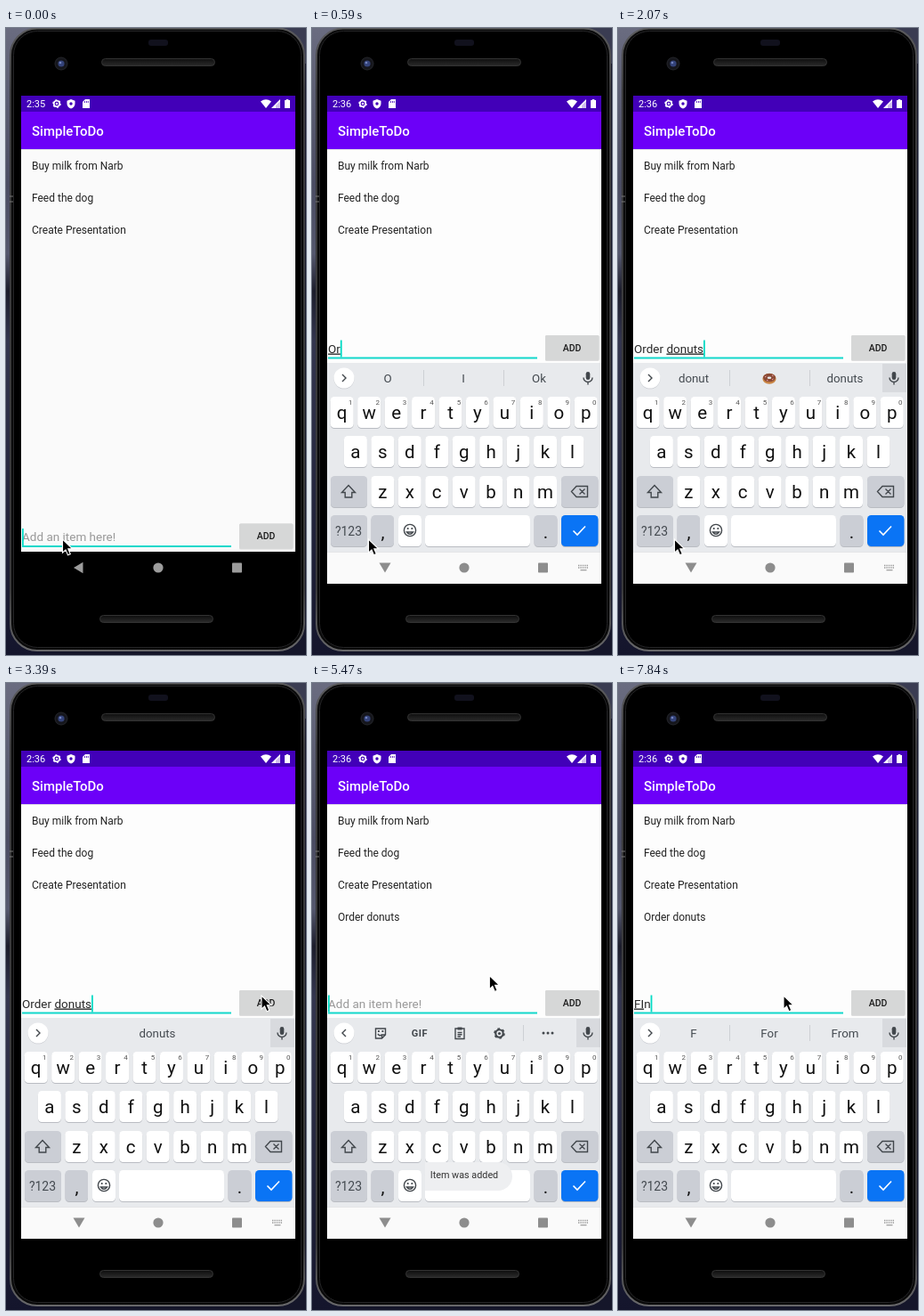
These frames come from a looping animation (337 by 704 pixels, 7990 ms). An HTML page:

```html
<!DOCTYPE html>
<html lang="en">
<head>
<meta charset="utf-8">
<title>To-do app</title>
<style>
  html, body { margin: 0; width: 100%; height: 100%; overflow: hidden; background: #15162a; }
  svg { display: block; width: 100vw; height: 100vh; font-family: Roboto, "Noto Sans", sans-serif; }
  text { white-space: pre; }
  .mid { text-anchor: middle; }
  .item { font-size: 12px; fill: #222; }
  .field { font-size: 13.5px; fill: #2a2a2a; }
  .hint { fill: #999; }
  .word { text-decoration: underline; }
  .letter { font-size: 20.5px; fill: #111; text-anchor: middle; }
  .digit { font-size: 8px; fill: #555; text-anchor: middle; }
  .sug { font-size: 13.3px; fill: #444a50; text-anchor: middle; }
  .line { fill: none; stroke: #42474c; stroke-width: 1.4; }
  .ink { fill: #42474c; }
</style>
</head>
<body>
<svg id="stage" viewBox="0 0 337 704" preserveAspectRatio="none">
  <defs>
    <linearGradient id="wall" x2="0" y2="1">
      <stop offset="0" stop-color="#6a6c80"/><stop offset=".25" stop-color="#4a4c62"/>
      <stop offset=".36" stop-color="#55586e"/><stop offset=".42" stop-color="#1c1d2c"/>
      <stop offset=".5" stop-color="#34364f"/><stop offset="1" stop-color="#14152c"/>
    </linearGradient>
    <linearGradient id="rim" x2="0" y2="1">
      <stop offset="0" stop-color="#5c5c5e"/><stop offset=".1" stop-color="#3c3c3e"/>
      <stop offset=".9" stop-color="#39393b"/><stop offset="1" stop-color="#68686a"/>
    </linearGradient>
    <linearGradient id="mesh" x2="0" y2="1">
      <stop offset="0" stop-color="#0e0e0e"/><stop offset="1" stop-color="#2b2b2b"/>
    </linearGradient>
    <g id="cog">
      <circle r="3.9" fill="none" stroke="currentColor" stroke-width="2"/>
      <circle r="5.1" fill="none" stroke="currentColor" stroke-width="1.5" stroke-dasharray="2.5 2.84"/>
      <circle r="1.5" fill="currentColor"/>
    </g>
  </defs>

  <!-- desktop and phone body -->
  <rect width="337" height="704" fill="#15162a"/>
  <rect width="40" height="704" fill="url(#wall)"/>
  <rect x="300" width="37" height="40" fill="#3a3c52"/>
  <rect x="5" y=".5" width="330" height="698.5" rx="30" fill="#0a0a0a" stroke="url(#rim)" stroke-width="2"/>
  <rect x="8.5" y="3.5" width="323" height="692" rx="27" fill="#000" stroke="#242426"/>
  <path d="M4 189h4M4 195h4" stroke="#777"/>
  <rect x="160" y="13" width="22" height="7" rx="3" fill="#11111d"/>
  <circle cx="62" cy="40" r="7" fill="#15161c" stroke="#25262b"/>
  <circle cx="62" cy="40" r="3.6" fill="#34437a"/>
  <circle cx="61" cy="39" r="1.3" fill="#7183bd"/>
  <g fill="url(#mesh)" stroke="#333">
    <rect x="107.5" y="34.5" width="127" height="8" rx="4"/>
    <rect x="105.5" y="659.5" width="127" height="8" rx="4"/>
  </g>

  <!-- app -->
  <rect id="page" x="17" y="136" width="308" height="452" fill="#fafafa"/>
  <rect x="17" y="76" width="308" height="18" fill="#4200b8"/>
  <rect x="17" y="94" width="308" height="42" fill="#6c00f8"/>
  <rect x="17" y="136" width="308" height="1" fill="#000" opacity=".1"/>
  <g fill="#fff" color="#fff">
    <text id="clock" x="23" y="89" font-size="11">2:35</text>
    <use href="#cog" transform="translate(57 85) scale(.82)"/>
    <path d="M73 80l4.5 1.7v3.2c0 2.6-1.9 4.6-4.5 5.6c-2.6-1-4.5-3-4.5-5.6v-3.2z"/>
    <circle cx="73" cy="85" r="1.7" fill="#4200b8"/>
    <path d="M89 80h5v10h-8v-7z"/>
    <path d="M88.500 82v2M90.500 82v2M92.300 82v2" stroke="#4200b8" stroke-width=".8"/>
    <path d="M286 82.500q6-4.600 12 0l-6 7.500z"/>
    <path d="M308 80v10h-10z"/>
    <path d="M303 87l5-5v8h-5z" fill="#4200b8" opacity=".25"/>
    <path d="M313 81h1.700v-1h2.600v1h1.700v9h-6z"/>
    <text x="29" y="121" font-size="15" font-weight="500">SimpleToDo</text>
  </g>
  <text class="item" x="29" y="158.500">Buy milk from Narb</text>
  <text class="item" x="29" y="194.500">Feed the dog</text>
  <text class="item" x="29" y="230.500">Create Presentation</text>
  <text class="item" id="added" x="29" y="266.500">Order donuts</text>

  <g id="entry">
    <text class="field hint" id="hint" x="18" y="576">Add an item here!</text>
    <text class="field" id="typed" x="18" y="576"><tspan id="plain"></tspan><tspan id="word" class="word"></tspan><tspan id="rest"></tspan></text>
    <rect x="18" y="581" width="235" height="2" fill="#12d8cb"/>
    <rect id="caret" y="562" width="1.800" height="19" fill="#03dac5"/>
    <rect x="262" y="556.500" width="60.500" height="29" rx="1.500" fill="#000" opacity=".12"/>
    <rect x="262" y="556.500" width="60.500" height="28" rx="1.500" fill="#d6d7d7"/>
    <text class="mid" x="292" y="574.300" font-size="10.500" font-weight="500" fill="#1c1c1c">ADD</text>
  </g>

  <g id="darkNav" fill="#9c9c9c">
    <path d="M76 606l10.500-6.300v12.600z"/>
    <circle cx="171" cy="606" r="5.600"/>
    <rect x="254" y="600.500" width="11" height="11" rx=".8"/>
  </g>

  <!-- keyboard -->
  <g id="board">
    <rect x="17" y="376" width="308" height="212" fill="#e8eaed"/>
    <rect id="micGlow" x="297" y="377" width="27" height="32" fill="#d8dade"/>
    <g id="keys"></g>
    <path class="line" d="M41 513.500l7.500 8h-3.700v5.500h-7.600v-5.500h-3.700z"/>
    <path class="line" d="M297 514.500h12.500v12h-12.500l-5.500-6zM300.500 517.500l6 6M306.500 517.500l-6 6"/>
    <text class="mid" x="41" y="569.500" font-size="14" fill="#444a50">?123</text>
    <circle class="line" cx="110" cy="564" r="6.600"/>
    <path class="line" d="M106.500 566q3.500 4.500 7 0z"/>
    <circle class="ink" cx="107.700" cy="562" r="1.100"/><circle class="ink" cx="112.300" cy="562" r="1.100"/>
    <path d="M293.500 564.500l4.500 4.500l9-9.500" fill="none" stroke="#fff" stroke-width="1.600"/>

    <circle cx="36" cy="393.800" r="11.500" fill="#c9ccd1"/>
    <circle cx="36" cy="393" r="11.500" fill="#fff"/>
    <path id="chevron" d="M34 389l4 4l-4 4" class="line"/>
    <g class="ink">
      <rect x="307.700" y="386" width="4.600" height="9" rx="2.300"/>
      <path class="line" d="M305 392.500a5 5 0 0 0 10 0M310 397.500v3"/>
    </g>
    <g id="sugs">
      <path id="bars" d="M125.500 384v18M215.500 384v18" stroke="#cdd0d4"/>
      <text class="sug" x="85" y="398"></text>
      <text class="sug" x="170" y="398"></text>
      <text class="sug" x="255" y="398"></text>
      <g id="donut">
        <ellipse cx="170" cy="393.800" rx="7.600" ry="6" fill="#c98545"/>
        <ellipse cx="170" cy="392.600" rx="7" ry="4.700" fill="#8a4a35"/>
        <path d="M165 392l1.500-1M173 390l1.500.6M167 395.500l1.500.3M173 395l1.500-1" stroke="#f3a7b5"/>
        <ellipse cx="170" cy="392.800" rx="2.300" ry="1.300" fill="#e8eaed"/>
      </g>
    </g>
    <g id="tools" color="#42474c">
      <path class="line" d="M71.500 388h11v7l-4 4h-7zM82.500 395h-4v4M74 394q2 3 4 1"/>
      <path class="ink" d="M74 390h1.800v2H74zM78.500 390h1.800v2h-1.800z"/>
      <text class="mid ink" x="121" y="397" font-size="11" font-weight="700" letter-spacing=".6">GIF</text>
      <path class="line" d="M161 388h10v11.500h-10zM163.500 392.500h5M163.500 394.700h5M163.500 397h3.500"/>
      <path class="ink" d="M163.500 386.500h5v3h-5z"/>
      <use href="#cog" transform="translate(210.500 393.500) scale(1.080)"/>
      <path d="M237.500 384v18" stroke="#cdd0d4"/>
      <circle class="ink" cx="260" cy="393" r="1.500"/><circle class="ink" cx="265" cy="393" r="1.500"/><circle class="ink" cx="270" cy="393" r="1.500"/>
    </g>

    <rect x="17" y="588" width="308" height="36" fill="#fafafa"/>
    <path d="M17 588.500h308" stroke="#e4e5e7"/>
    <g fill="#8d8d8d">
      <path d="M75.500 600.500h13l-6.500 11z"/>
      <circle cx="171" cy="606" r="5.600"/>
      <rect x="254" y="600.500" width="11" height="11" rx=".8"/>
    </g>
    <path d="M299 603.500h12M299 606h12" stroke="#999" stroke-width="1.400" stroke-dasharray="1.400 1"/>
    <path d="M301.500 608.700h7" stroke="#999" stroke-width="1.200"/>
    <g id="toast">
      <path d="M127 538h82a16 16 0 0 1 0 32h-82z" fill="#eeeff1"/>
      <text class="mid" x="171" y="556" font-size="10.800" fill="#333">Item was added</text>
    </g>
  </g>

  <path id="pointer" d="M0 0v15.200l3.500-3.300l2.500 5.900l2.800-1.200l-2.500-5.800h4.900z" fill="#000" stroke="#fff" stroke-width="1.100"/>
</svg>

<script>
const LOOP = 7990, TICK = 147.2;
const $ = id => document.getElementById(id);
const show = (id, on) => { $(id).style.display = on ? "" : "none"; };

// Keys
const GRAY = "#cbced5";
let markup = "";
function key(x, y, w, fill = "#fff") {
  markup += `<rect x="${x}" y="${y + 1}" width="${w}" height="35" rx="4.500" fill="#b9bcc2"/>` +
            `<rect x="${x}" y="${y}" width="${w}" height="35" rx="4.500" fill="${fill}"/>`;
}
function label(kind, x, y, s) {
  markup += `<text class="${kind}" x="${x}" y="${y}">${s}</text>`;
}
[["qwertyuiop", 33.7, 414], ["asdfghjkl", 48.9, 458], ["zxcvbnm", 79.3, 503]].forEach(([row, x0, y], r) => {
  [...row].forEach((c, i) => {
    const x = x0 + i * 30.45;
    key(x - 13, y, 26);
    label("letter", x, y + 24.5, c);
    if (!r) label("digit", x + 9.5, y + 9, (i + 1) % 10);
  });
});
key(21, 503, 41, GRAY);
key(280, 503, 41.5, GRAY);
key(21, 547, 41, GRAY);
key(66.5, 547, 25.5, GRAY);
key(97, 547, 26, "#fff");
key(127, 547, 118, "#fff");
key(249.5, 547, 26, GRAY);
key(280, 547, 41.5, "#0a74f5");
label("letter", 79.5, 573, ",");
label("letter", 262.5, 573, ".");
$("keys").innerHTML = markup;

// Last entry whose start time has passed
const at = (list, t) => list.filter(e => e[0] <= t).pop();

// start, finished text, underlined word, letters not yet underlined
const typing = [
  [0, "", "", ""], [450, "", "O", ""], [590, "", "Or", ""], [740, "", "Ord", ""],
  [880, "", "Orde", ""], [1030, "", "Order", ""], [1180, "Order ", "", ""],
  [1470, "Order ", "d", ""], [1620, "Order ", "do", ""], [1770, "Order ", "don", ""],
  [1920, "Order ", "donu", ""], [2070, "Order ", "donuts", ""],
  [3690, "", "", ""], [7690, "", "F", ""], [7840, "", "FI", "n"]
];
// start, three suggestions; none means the tool strip
const hints = [
  [0], [450, "O", "I", "Ok"], [740, "Or", "Of", "Order"], [1030, "Order", "Ordered", "Orders"],
  [1320, "for", "the", "a"], [1620, "do", "donut", "does"], [1920, "donut", "🍩", "donuts"],
  [2650, "", "donuts", ""], [3840], [7690, "F", "For", "From"]
];
const blink = [
  [0, 1], [2510, 0], [2950, 1], [4730, 0], [5180, 1], [5620, 0],
  [5910, 1], [6340, 0], [6790, 1], [7240, 0], [7690, 1]
];
const toast = [
  [0, 0], [3990, .4], [4130, .8], [4280, 1], [5910, .6], [6060, .3], [6200, 0]
];

const moves = [
  { start: 2360, from: [63.5, 574], a: [230, 450], b: [400, 351], to: [287, 351] },
  { start: 4730, from: [286, 351], a: [262, 304], b: [200, 304], to: [186, 351] }
];
function pointerAt(t) {
  const m = t < moves[1].start ? moves[0] : moves[1];
  const tick = Math.floor((t - m.start + 6) / TICK);
  const first = m === moves[0] ? 1 : 0;
  const p = Math.min(1, Math.max(0, (tick + first) / (7 + first)));
  const k = p * p * (3 - 2 * p), q = 1 - k;
  return [0, 1].map(i => q * q * q * m.from[i] + 3 * q * q * k * m.a[i] + 3 * q * k * k * m.b[i] + k * k * k * m.to[i]);
}

const cells = document.querySelectorAll(".sug");

function draw(t) {
  const open = t >= 300;
  show("board", open);
  show("darkNav", !open);
  $("entry").setAttribute("transform", `translate(0 ${open ? -211.5 : 0})`);
  $("page").setAttribute("fill", open ? "#fdfdfd" : "#fafafa");
  $("clock").textContent = open ? "2:36" : "2:35";
  show("added", t >= 3690);
  show("micGlow", t >= 1470);

  const [, plain, word, rest] = at(typing, t);
  $("plain").textContent = plain;
  $("word").textContent = word;
  $("rest").textContent = rest;
  const full = plain + word + rest;
  show("hint", !full);
  $("caret").setAttribute("x", 18 + (full ? $("typed").getComputedTextLength() : 0));
  show("caret", at(blink, t)[1]);

  const words = at(hints, t).slice(1);
  const strip = words.length === 0;
  show("tools", strip);
  show("sugs", !strip);
  show("bars", words[0]);
  show("donut", words[1] === "🍩");
  cells.forEach((c, i) => { c.textContent = words[i] === "🍩" ? "" : words[i] || ""; });
  $("chevron").setAttribute("d", strip ? "M38 389l-4 4l4 4" : "M34 389l4 4l-4 4");

  $("toast").setAttribute("opacity", at(toast, t)[1]);
  $("pointer").setAttribute("transform", `translate(${pointerAt(t)})`);
}

let begin;
function loop(now) {
  begin ??= now;
  draw((now - begin) % LOOP);
  requestAnimationFrame(loop);
}
draw(0);
requestAnimationFrame(loop);
</script>
</body>
</html>
```
